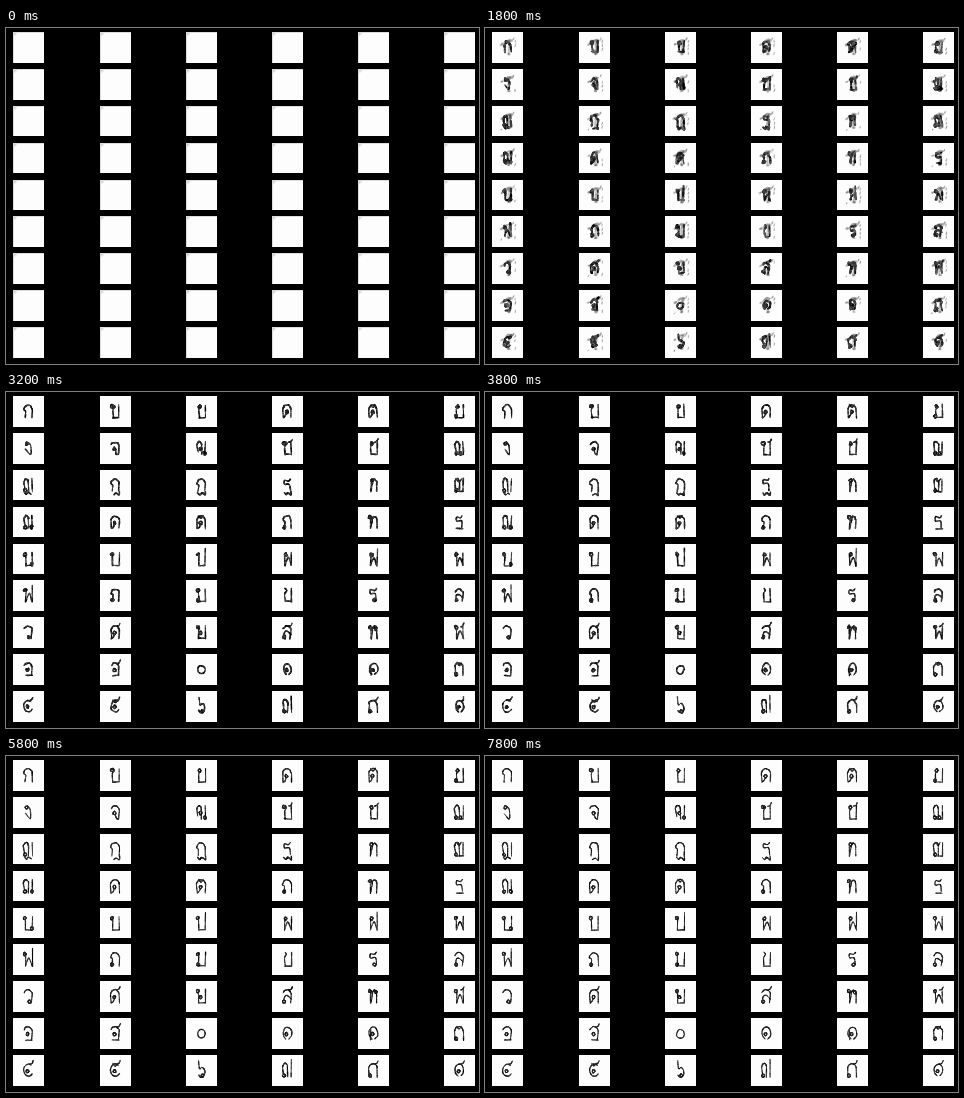
Write an HTML page with a canvas that moves like this. It is 473 px wide and 336 px high and loops after 8000 ms.

```html
<!DOCTYPE html>
<html lang="th">
<head>
<meta charset="utf-8">
<title>Letters taking shape</title>
<style>
  html, body { margin: 0; width: 100%; height: 100%; overflow: hidden; background: #000; }
  canvas { display: block; }
</style>
</head>
<body>
<canvas id="stage" width="473" height="336"></canvas>
<script>
const ctx = document.getElementById('stage').getContext('2d');
const COLUMNS = 6, STEP_MS = 200, STEPS = 40;

// Parts live in a box of 10 by 10, y downwards; arcs run clockwise and count in turns.
const arc = (cx, cy, rx, ry, from, to) =>
  Array.from({ length: 8 }, (_, i) => {
    const a = 2 * Math.PI * (from + (to - from) * i / 7);
    return [cx + rx * Math.cos(a), cy + ry * Math.sin(a)];
  });
const ring = (x, y, r = 1.4) => arc(x, y, r, r * 0.8, 0, 1);
const path = text => text.split(' ').map(pair => pair.split(',').map(Number));
const upright = (x, top) => [[x, top], [x, 10]];
const dome = arc(4.5, 4, 4.5, 3.8, 0.5, 1);

const parts = {
  headLeft: ring(1.3, 1.2),
  headIn: ring(3, 1.5),
  headRight: ring(7.5, 2),
  heart: ring(4, 5.7),
  footLeft: ring(1.5, 9),
  footMid: ring(6, 9),
  footRight: ring(8.5, 9),
  zero: ring(5, 5.5, 4),

  left: upright(2, 2),
  right: upright(9, 0),
  tall: upright(9, -3),
  base: path('2,10 9,10'),
  vee: path('2,10 5.5,4 9,10'),
  leg: path('4,6.5 2.5,9 0.5,10'),
  chin: path('8,10 6,9.5 5,7'),
  flag: path('6,0.5 8.5,0 10,-2'),
  notch: path('2,0 4.5,2 7,0'),
  neck: path('2.5,0 4,1.5 2,4 2.5,10'),
  elbow: path('4,0.5 7,3 7,10 2,6'),
  wave: path('1,8 2,5 5,4.5 9,7'),
  roof: path('8,0 6,1.5 2,1 2,4 7,4 8,9'),
  tail: path('9,10 9,13 6,11.5 3,12.5'),
  under: path('1,11 3,12.5 5,11 8,12'),

  arch: [[0.5, 10], ...dome, [9, 10]],
  beak: [[1.5, 10], [2, 5], ...dome, [9, 10]],
  curl: [...dome.slice(1), [8, 10]],
  narrow: [[1, 8], ...arc(2.5, 3, 2.5, 3, 0.5, 1), [5, 10]],
  hump: [[2, 10], ...arc(6, 4, 2.5, 3.5, 0.5, 1), [8.5, 10]],
  spiral: arc(5, 5, 5, 4.5, 0.1, 0.85),
  snail: arc(5, 5, 4.5, 4.5, 0.3, 1.2),
  six: [[2, -2], ...arc(5, 6.5, 3.5, 3.5, 0.65, 1.4)],
};

const letters = `
  beak
  headLeft neck base right
  headIn neck base right
  arch heart leg
  arch notch heart leg
  headIn neck footLeft base right
  headIn elbow
  curl chin heart
  narrow heart footRight right
  headLeft neck base right flag
  headIn neck base right flag
  narrow footLeft footMid base right
  narrow footLeft right under
  beak tail
  beak tail under
  roof tail under
  headIn left hump
  narrow notch footLeft base right
  narrow footLeft footRight right
  arch heart leg
  arch notch heart leg
  beak footLeft
  headLeft left hump
  roof base
  headLeft left base footRight right
  headLeft left base right
  headLeft left base tall
  headIn left vee right
  headIn left vee tall
  headLeft left vee right
  headLeft left vee tall
  beak footLeft
  headLeft left footLeft base right
  neck base right
  roof footMid
  curl wave footLeft
  curl footMid
  arch heart leg flag
  headLeft left base right heart
  curl wave footLeft flag
  headLeft left hump headRight
  headLeft left vee right flag
  curl base heart
  curl base heart flag
  zero
  snail heart
  left snail heart
  arch notch footLeft
  spiral heart flag
  spiral heart notch flag
  six footMid
  narrow footLeft tall
  arch footLeft flag
  snail heart flag
`.trim().split('\n').map(names => names.trim().split(' ').map(name =>
  parts[name].map(([x, y]) => [10.6 + 0.97 * x, 8.4 + 1.36 * y])));

// The shared smudge every letter grows out of, in cell pixels.
const smudge = [
  { points: path('9,13 11,12'), width: 2 },
  { points: path('13,11 16,8.5 20,8.5'), width: 2.4 },
  { points: path('18,9 17,13 16.5,22'), width: 2.4 },
  { points: path('15.5,22 18,22'), width: 1.8 },
  { points: path('21,8 22,6'), width: 1.4 },
];

const clamp = v => Math.max(0, Math.min(1, v));

function randomFrom(seed) {
  const next = () => {
    seed = (Math.imul(seed, 1664525) + 1013904223) >>> 0;
    return seed / 4294967296;
  };
  for (let i = 0; i < 3; i++) next();
  return next;
}

function spline(a, b, c, d, t) {
  return b + t / 2 * (c - a + t * (2 * a - 5 * b + 4 * c - d + t * (3 * (b - c) + d - a)));
}

function ink(points, width, roughness, random) {
  const at = i => points[Math.max(0, Math.min(points.length - 1, i))];
  let from = points[0];
  for (let i = 0; i < points.length - 1; i++) {
    for (let t = 0.25; t <= 1; t += 0.25) {
      const to = [0, 1].map(k => spline(at(i - 1)[k], at(i)[k], at(i + 1)[k], at(i + 2)[k], t));
      const shade = Math.round(random() * 130 * roughness);
      ctx.strokeStyle = `rgb(${shade},${shade},${shade})`;
      ctx.lineWidth = width * (1 + (random() - 0.5) * roughness);
      ctx.beginPath();
      ctx.moveTo(...from);
      ctx.lineTo(...to);
      ctx.stroke();
      from = to;
    }
  }
}

function shake(points, amount, random) {
  return points.map(p => p.map(v => v + (random() - 0.5) * amount));
}

function drawSmudge(random) {
  for (const { points, width } of smudge) ink(shake(points, 0.8, random), width, 0.9, random);
  for (let y = 8; y < 24; y += 4) {
    if (random() < 0.6) ink(shake([[23.5, y], [23, y + 2.5]], 0.8, random), 1.1, 0.6, random);
  }
  if (random() < 0.3) ink(shake([[9, 24], [10, 23]], 1, random), 1, 0.6, random);
}

function drawLetter(strokes, step, random) {
  const form = 1 - 0.45 * Math.exp(-(step - 5) / 6);
  const unrest = Math.exp(-(step - 5) / 9);
  for (const stroke of strokes) {
    const points = stroke.map(([x, y]) => [16 + (x - 16) * form, 14 + (y - 14) * form]);
    ink(shake(points, 0.5 + 1.8 * unrest, random), 1.05 + 1.2 * unrest, 0.5 + 0.5 * unrest, random);
  }
}

function drawCell(strokes, index, step) {
  const left = Math.round(7.3 + 86.2 * (index % COLUMNS));
  const rowY = 4 + 36.89 * Math.floor(index / COLUMNS);
  const top = Math.round(rowY);
  const width = 31, height = Math.round(rowY + 30.65) - top;
  const random = randomFrom(step * 7919 + index * 104729 + 17);

  ctx.save();
  ctx.translate(left, top);
  ctx.beginPath();
  ctx.rect(0, 0, width, height);
  ctx.clip();
  ctx.fillStyle = '#fdfdfd';
  ctx.fillRect(0, 0, width, height);
  if (step === 0) {
    const corner = ctx.createRadialGradient(0, 0, 0, 0, 0, 5);
    corner.addColorStop(0, '#aaa');
    corner.addColorStop(1, '#fdfdfd');
    ctx.fillStyle = corner;
    ctx.fillRect(0, 0, 6, 6);
    ctx.fillStyle = '#ddd';
    ctx.fillRect(0, 0, width, 1);
    ctx.fillRect(0, 0, 1, height);
  }
  ctx.globalAlpha = step <= 5 ? step / 5 : clamp((10 - step) / 5);
  if (ctx.globalAlpha > 0) drawSmudge(random);
  ctx.globalAlpha = clamp((step - 5) / 4);
  if (ctx.globalAlpha > 0) drawLetter(strokes, step, random);
  ctx.restore();
}

function draw(step) {
  ctx.fillStyle = '#000';
  ctx.fillRect(0, 0, 473, 336);
  ctx.lineCap = 'round';
  letters.forEach((strokes, index) => drawCell(strokes, index, step));
}

let shown = -1;
function tick() {
  const step = Math.floor(performance.now() / STEP_MS) % STEPS;
  if (step !== shown) draw(shown = step);
  requestAnimationFrame(tick);
}
tick();
</script>
</body>
</html>
```
